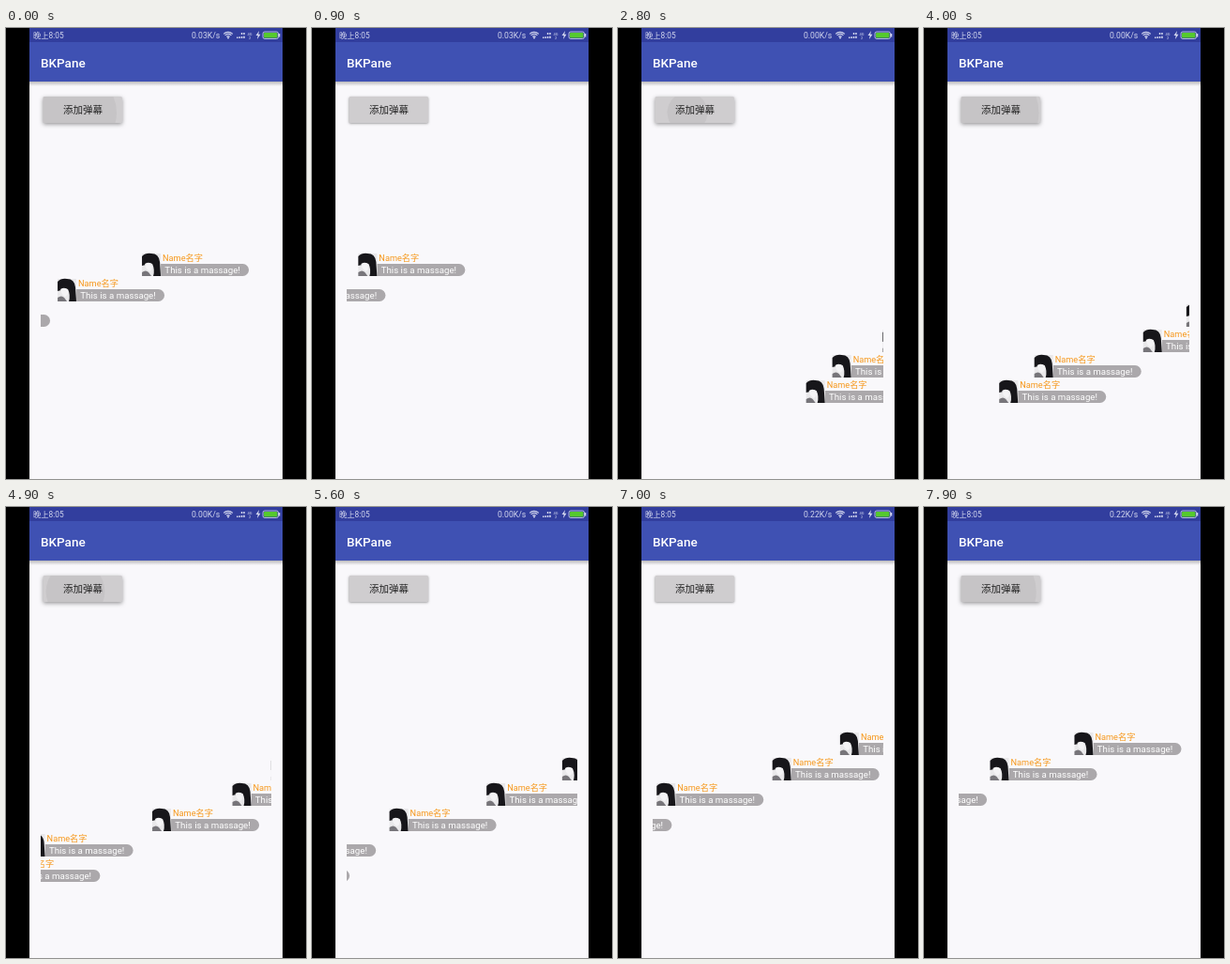
Recreate the animation shown at these times as an HTML page with a canvas. Size 320x480 px, loop 8000 ms.

```html
<!DOCTYPE html>
<html lang="zh">
<head>
<meta charset="utf-8">
<style>
  html, body { margin: 0; width: 100%; height: 100%; overflow: hidden; background: #000; }
  canvas { display: block; width: 320px; height: 480px; }
</style>
</head>
<body>
<canvas id="stage" width="320" height="480"></canvas>
<script>
const g = document.getElementById('stage').getContext('2d');
const LOOP = 8000, STEP = 100, CROSSING = 6000;
const FONT = 'Roboto, "Noto Sans CJK SC", "Noto Sans CJK", sans-serif';

// [top, start time] of each comment
const comments = [
  [294, -4478], [267, -3204], [240, -2357], [375, 1030], [348, 1380],
  [321, 2652], [294, 3667], [267, 4840], [240, 5697]
];
const presses = [-400, 930, 1250, 2650, 3550, 4640, 5960, 7480];

function rect(x, y, w, h, color) {
  g.fillStyle = color;
  g.fillRect(x, y, w, h);
}

function round(x, y, w, h, r, color) {
  g.fillStyle = color;
  g.beginPath();
  g.roundRect(x, y, w, h, r);
  g.fill();
}

function text(str, x, y, size, color, weight = 400) {
  g.font = `${weight} ${size}px ${FONT}`;
  g.fillStyle = color;
  g.fillText(str, x, y);
}

function shape(path, color) {
  g.fillStyle = color;
  g.fill(new Path2D(path));
}

function clipped(x, y, w, h, draw) {
  g.save();
  g.beginPath();
  g.rect(x, y, w, h);
  g.clip();
  draw();
  g.restore();
}

function statusBar(t) {
  const ink = '#d3d7ee';
  rect(25, 0, 270, 15, '#323e9e');
  text('晚上8:05', 29, 11, 8.3, ink);
  const speed = t < 1700 ? '0.03' : t < 5700 ? '0.00' : '0.22';
  text(speed + 'K/s', 198, 11, 8.6, ink);

  g.strokeStyle = ink;
  g.lineWidth = 1.1;
  for (const r of [2.3, 4.6, 6.6]) {
    g.beginPath();
    g.arc(237, 11, r, -Math.PI * 0.76, -Math.PI * 0.24);
    g.stroke();
  }
  round(236, 9.6, 2, 2, 1, ink);

  for (let i = 0; i < 4; i++) {
    rect(246 + i * 2.4, 9.5 - i * 0.3, 1.5, 1.5 + i * 0.3, ink);
    if (i > 1) rect(246 + i * 2.4, 5, 1.5, 2, ink);
  }
  text('4G', 257.5, 7.5, 4, ink);
  text('2', 259, 11.5, 4, ink);
  shape('M270 3l-3.5 5h2.2l-.8 4 3.6-5.2h-2.3z', ink);

  g.lineWidth = 0.8;
  g.beginPath();
  g.roundRect(274, 4, 16.5, 7.5, 2);
  g.stroke();
  round(275, 5, 14.5, 5.5, 1, '#55c92e');
  rect(291, 6, 1.3, 3.5, ink);
}

function toolbar() {
  const shade = g.createLinearGradient(0, 57, 0, 62);
  shade.addColorStop(0, 'rgba(0,0,0,.25)');
  shade.addColorStop(1, 'rgba(0,0,0,0)');
  rect(25, 57, 270, 5, shade);
  rect(25, 15, 270, 42, '#3f51b3');
  text('BKPane', 37, 42, 13.5, '#fff', 500);
}

function button(t) {
  const press = presses.find(s => t >= s && t < s + 470);
  const down = press !== undefined;
  g.save();
  g.shadowColor = 'rgba(0,0,0,.4)';
  g.shadowBlur = down ? 4 : 2.5;
  g.shadowOffsetY = down ? 1.5 : 0.8;
  round(39.5, 73, 84.5, 28, 1.5, '#cfcdcf');
  g.restore();
  if (down) {
    const age = (t - press) / 1000;
    clipped(39.5, 73, 84.5, 28, () => {
      const r = 8 + 90 * age;
      round(74 - r, 90 - r, 2 * r, 2 * r, r, 'rgba(0,0,0,.045)');
    });
  }
  text('添加弹幕', 61, 91, 10.5, '#222');
}

function avatar() {
  rect(0, 0, 20, 24, '#e9e8ea');
  shape('M0 3Q4-1 10 0Q18 0 19 9L20 24H12Q14 17 11 11Q7 9 4 12L0 13z', '#17161a');
  shape('M3 11Q8 8 11 12Q12 17 8 19Q4 17 3 11z', '#f4f3f5');
  shape('M0 20Q4 17 7 20L10 24H0z', '#77757a');
}

function comment(x, y) {
  g.save();
  g.translate(x, y);
  round(20, 11, 94, 13, [0, 6.5, 6.5, 0], '#aba8ab');
  avatar();
  text('Name名字', 22, 8.3, 9.2, '#f6981c');
  text('This is a massage!', 24.3, 21, 9.7, '#fff');
  g.restore();
}

function draw(t) {
  rect(0, 0, 320, 480, '#000');
  rect(25, 0, 270, 480, '#f9f8fb');
  statusBar(t);
  toolbar();
  button(t);
  clipped(37, 230, 246, 175, () => {
    for (const [y, start] of comments) {
      const p = (t - start) / CROSSING;
      if (p > 0 && p < 1) comment(77 + 206 * Math.cos(Math.PI * p), y);
    }
  });
}

function frame() {
  draw(Math.floor(performance.now() % LOOP / STEP) * STEP);
  requestAnimationFrame(frame);
}
frame();
</script>
</body>
</html>
```
